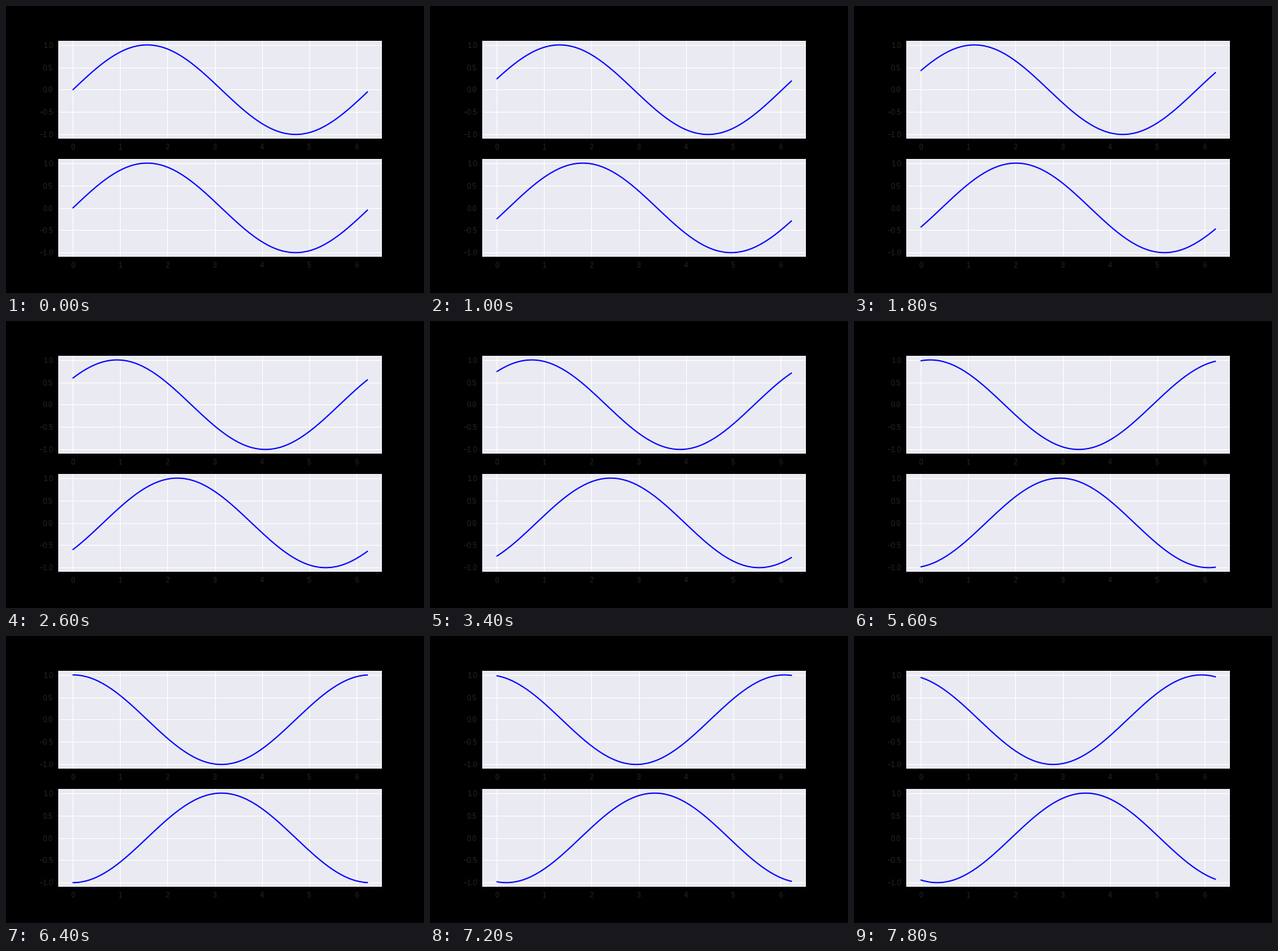
A matplotlib script that plays this animation: 576x396 px, repeating every 8000 ms.

```python
import numpy as np
import matplotlib.pyplot as plt
from matplotlib.animation import FuncAnimation
from matplotlib.ticker import MultipleLocator

SAMPLES = 128
FRAMES = 40
INTERVAL = 200  # ms

plt.rcParams.update({
    "font.family": "Liberation Sans",
    "font.size": 10,
    "axes.facecolor": "#EAEAF2",
    "axes.linewidth": 0,
    "axes.edgecolor": "white",
    "axes.grid": True,
    "axes.axisbelow": True,
    "axes.xmargin": 0.05,
    "axes.ymargin": 0.05,
    "grid.color": "white",
    "grid.linewidth": 1,
    "grid.linestyle": "-",
    "xtick.color": "0.15",
    "ytick.color": "0.15",
    "xtick.major.size": 0,
    "ytick.major.size": 0,
    "xtick.major.pad": 7,
    "ytick.major.pad": 7,
    "lines.solid_capstyle": "round",
})

step = 2 * np.pi / SAMPLES
x = np.arange(SAMPLES) * step

fig, axes = plt.subplots(2, 1, figsize=(8, 5.5), dpi=72, facecolor="black")
fig.subplots_adjust(left=0.125, right=0.9, bottom=0.125, top=0.88, hspace=0.2)

lines = []
for ax in axes:
    line, = ax.plot(x, np.sin(x), color="#0000FF", linewidth=1.75)
    ax.xaxis.set_major_locator(MultipleLocator(1))
    ax.yaxis.set_major_locator(MultipleLocator(0.5))
    ax.set_xlim(ax.get_xlim())
    ax.set_ylim(-1.1, 1.1)
    lines.append(line)


def update(i):
    """Shift the upper wave left and the lower wave right, one sample per frame."""
    for line, sign in zip(lines, (1, -1)):
        line.set_ydata(np.sin(x + sign * i * step))
    return lines


anim = FuncAnimation(fig, update, frames=FRAMES, interval=INTERVAL,
                     repeat=True, repeat_delay=0, blit=False)
plt.show()
```
